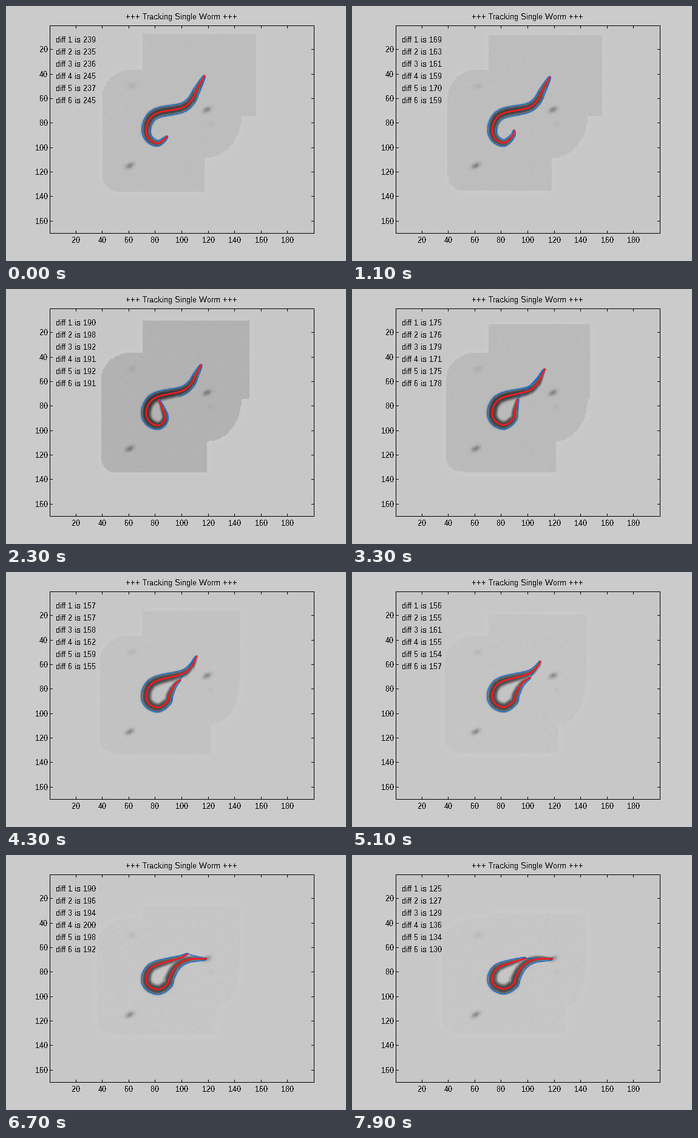
These frames come from a looping animation (560x420 px, 8000 ms). A matplotlib script:

```python
import numpy as np
import matplotlib.pyplot as plt
from matplotlib.animation import FuncAnimation
from matplotlib.patches import Rectangle
from matplotlib.path import Path

W, H, DPI = 560, 420, 100
PX = 72 / DPI                      # points per pixel
LEFT, RIGHT, TOP, BOTTOM = 72, 508, 32, 375
COLS, ROWS = 200, 170
N = 120                            # samples along the worm
HOLD, END, FRAMES, STEP = 400, 7900, 80, 100

plt.rcParams.update({
    "font.family": "Liberation Sans",
    "text.hinting": "native",
    "text.hinting_factor": 1,
    "text.antialiased": False,
})

# The worm slides along this track, tail side first
TRACK = [(327, 115), (314, 139), (305, 156), (289, 168), (250, 176),
         (235, 189), (231, 207), (237, 220), (251, 226), (266, 214),
         (270, 201), (281, 182), (300, 172), (333, 171)]


def smooth_curve(points):
    """Catmull-Rom curve through the points."""
    p = np.array(points, float)
    p = np.vstack([2 * p[0] - p[1], p, 2 * p[-1] - p[-2]])
    s = np.linspace(0, 1, 20, endpoint=False)[:, None]
    parts = []
    for a, b, c, d in zip(p, p[1:], p[2:], p[3:]):
        parts.append(b + 0.5 * s * (c - a + s * (2 * a - 5 * b + 4 * c - d
                                                 + s * (3 * (b - c) + d - a))))
    return np.vstack(parts + [p[-2:-1]])


def arc(cx, cy, rx, ry, a0, a1):
    a = np.radians(np.linspace(a0, a1, 10))
    return np.column_stack([cx + rx * np.cos(a), cy + ry * np.sin(a)])


def blur(a, r):
    for axis in (0, 1):
        a = sum(np.roll(a, k, axis) for k in range(-r, r + 1)) / (2 * r + 1)
    return a


def progress(t):
    return (t - HOLD) / (END - HOLD)


gx, gy = np.meshgrid(LEFT + (np.arange(COLS) + 0.5) * (RIGHT - LEFT) / COLS,
                     TOP + (np.arange(ROWS) + 0.5) * (BOTTOM - TOP) / ROWS)
grid = np.column_stack([gx.ravel(), gy.ravel()])
rng = np.random.default_rng(4)
grain = rng.normal(0, 1.2, (ROWS, COLS))
jitter = rng.uniform(-6, 6, (FRAMES, 6))


def spot(cx, cy, length, width, depth):
    a = np.radians(-28)
    x, y = gx - cx, gy - cy
    u, v = x * np.cos(a) + y * np.sin(a), y * np.cos(a) - x * np.sin(a)
    return depth * np.exp(-(u / length) ** 2 - (v / width) ** 2)


spots = spot(204, 263, 7, 4, 62) + spot(331, 171, 7, 4, 58)
spots += spot(207, 132, 7, 5, 12) + spot(337, 194, 4, 4, 8)

track = smooth_curve(TRACK)
length = np.r_[0, np.cumsum(np.hypot(*np.diff(track, axis=0).T))]
u = np.linspace(0, 1, N)
bulge = np.sin(np.pi * u).clip(0)
half = 1.5 + 6.7 * bulge ** 0.6
depth = 75 + 50 * bulge ** 0.5
win = np.s_[30:108, 60:135]        # part of the picture the worm can reach


def midline(t):
    tail = np.interp(t, [HOLD, 1100, 4300, END], [0, 2, 27, 70])
    head = np.interp(t, [HOLD, 2300, 5800, 6700], [195, 221, 253, 283])
    s = tail + u * (min(head, length[-1]) - tail)
    x, y = (np.interp(s, length, c) for c in track.T)
    # the loop slowly flattens
    y -= 0.22 * progress(t) * (y - 201) * np.exp(-((x - 245) / 30) ** 2)
    # the head curls inwards just before it slips past the body
    curl = np.exp(-((t - 2400) / 800) ** 2) * ((u - 0.8) / 0.2).clip(0) ** 2
    return np.column_stack([x - 24 * curl, y - 8 * curl])


def sheet_shade(t):
    p = progress(t)
    right = 411 - 26 * np.clip((t - 1100) / 3200, 0, 1)
    top, step = 46 + 50 * p ** 1.5, min(388, right)
    low, bot, left = 326 + 24 * p, 306 - 12 * p, 159 - 10 * p
    dark = np.interp(t, [1100, 2300, 4300, 5800], [10, 21, 5, 1.5])
    outline = np.vstack([
        [(225, top), (right, top), (right, 181)],
        arc(low, 181, step - low, 70, 0, 90),
        [(low, bot)],
        arc(left + 25, bot - 25, 25, 25, 90, 180),
        arc(left + 50, 149, 50, 45, 180, 270),
        [(225, 104)],
    ])
    mask = Path(outline).contains_points(grid).reshape(ROWS, COLS).astype(float)
    return mask * (grain - dark) + 4 * blur(mask, 4) * (1 - mask)


def picture(t, mid):
    img = 199 + sheet_shade(t) - spots
    dx = gx[win][..., None] - mid[:, 0]
    dy = gy[win][..., None] - mid[:, 1]
    q = (dx ** 2 + dy ** 2) / half ** 2
    img[win] -= depth[q.argmin(axis=-1)] * np.exp(-q.min(axis=-1) ** 2)
    return img


def contour(t, mid):
    tan = np.gradient(mid, axis=0)
    tan /= np.hypot(*tan.T)[:, None]
    off = half[:, None] * np.column_stack([-tan[:, 1], tan[:, 0]])
    # once the loop closes, its inner edge is no longer traced
    cut = N if t < 2000 else int(0.3 * N) if t < 3000 else 0
    parts = [mid[:1], mid + off, mid[-1:]]
    if 0 < cut < N:
        parts.append([(np.nan, np.nan)])
    parts += [(mid - off)[:cut][::-1], mid[:1]]
    return np.vstack(parts)


fig = plt.figure(figsize=(W / DPI, H / DPI), dpi=DPI, facecolor="#cbcbcb")
ax = fig.add_axes([0, 0, 1, 1])
ax.axis("off")

image = ax.imshow(np.zeros((ROWS, COLS)), cmap="gray", vmin=0, vmax=255,
                  extent=(LEFT, RIGHT, BOTTOM, TOP), interpolation="nearest",
                  aspect="auto")
blue, = ax.plot([], [], color="#0a6cd8", lw=1.4 * PX)
red, = ax.plot([], [], color="#ff1822", lw=2.6 * PX, solid_capstyle="round")
ax.set_xlim(0, W)
ax.set_ylim(H, 0)


def bar(x, y, w, h):
    ax.add_patch(Rectangle((x, y), w, h, fc="black", lw=0, zorder=3,
                           antialiased=False))


def label(x, y, s, ha="center"):
    return ax.text(x, y, s, fontsize=13 * PX, ha=ha, va="baseline")


for y in (TOP, BOTTOM - 1):
    bar(LEFT, y, RIGHT - LEFT, 1)
for x in (LEFT, RIGHT - 1):
    bar(x, TOP, 1, BOTTOM - TOP)
for v in range(20, 181, 20):
    x = round(LEFT + (v - 0.5) * (RIGHT - LEFT) / COLS)
    bar(x, TOP, 1, 5)
    bar(x, BOTTOM - 5, 1, 5)
    label(x + 0.5, 390, str(v))
for v in range(20, 161, 20):
    y = round(TOP + (v - 0.5) * (BOTTOM - TOP) / ROWS)
    bar(LEFT, y, 5, 1)
    bar(RIGHT - 5, y, 5, 1)
    label(69, y + 5, str(v), ha="right")
label(289, 22, "+++ Tracking Single Worm +++")
lines = [label(82, 60 + 20 * i, "", ha="left") for i in range(6)]


def update(k):
    t = max(k * STEP, HOLD)
    mid = midline(t)
    image.set_data(picture(t, mid))
    red.set_data(*mid.T)
    blue.set_data(*contour(t, mid).T)
    level = np.interp(t, [HOLD, 1100, 2300, 4300, 5800, 6700, END],
                      [241, 164, 193, 159, 158, 195, 131])
    for i, line in enumerate(lines):
        value = level + jitter[t // STEP, i]
        line.set_text(f"diff {i + 1} is {round(value)}")
    return [image, red, blue, *lines]


anim = FuncAnimation(fig, update, frames=FRAMES, interval=STEP, repeat=True)
plt.show()
```
